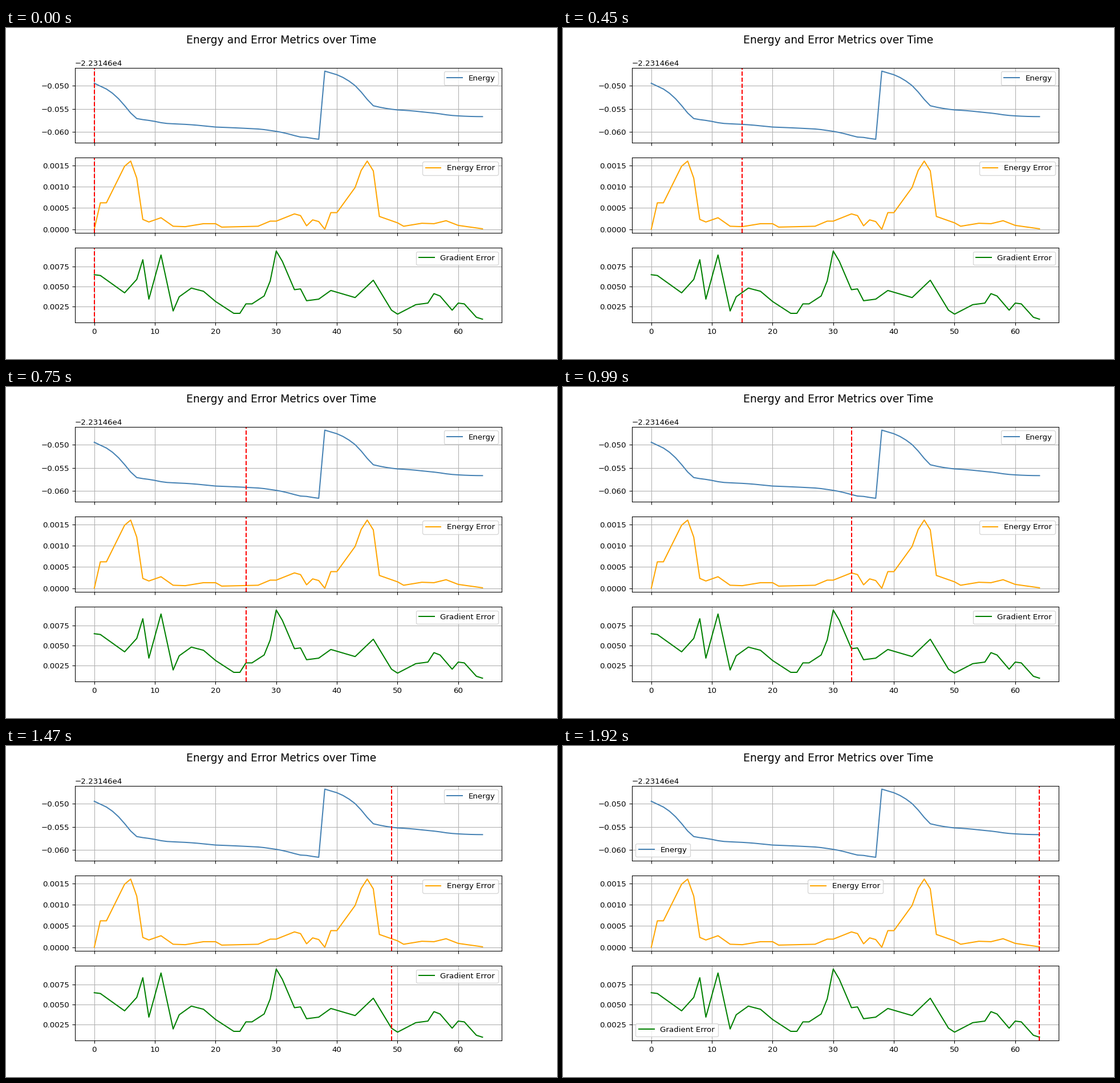
These frames come from a looping animation (966 by 580 pixels, 1.95 s). A matplotlib script:

```python
import numpy as np
import matplotlib.pyplot as plt
from matplotlib.animation import FuncAnimation

STEPS = 65
INTERVAL = 30  # ms
RESTART = 38   # step at which the second descent begins
E_START = -22314.64948
E_JUMP = 0.01472

x = np.arange(STEPS)


def polyline(*keys):
    """Values at every step on straight lines through (step, value) keys."""
    return np.interp(x, *zip(*keys))


# Two descents, each a burst followed by small ripples
energy_error = 1e-5 * polyline(
    (0, 0), (1, 62), (2, 62), (5, 148), (6, 160), (7, 120), (8, 23),
    (9, 17), (11, 27), (13, 7), (15, 6), (18, 13), (20, 13), (21, 5),
    (27, 7), (29, 19), (30, 19), (33, 36), (34, 32), (35, 8), (36, 22),
    (37, 18), (RESTART, 0), (39, 39), (40, 39), (43, 98), (44, 138),
    (45, 160), (46, 137), (47, 30), (50, 15), (51, 7), (54, 14),
    (56, 13), (58, 20), (60, 9), (64, 1),
)

# The error is the energy lost in each step
energy = E_START - np.cumsum(energy_error) + E_JUMP * (x >= RESTART)

grad_error = 1e-4 * polyline(
    (0, 65), (1, 64), (5, 42), (7, 59), (8, 84), (9, 34), (11, 90),
    (13, 19), (14, 37), (16, 48), (18, 44), (20, 31), (23, 16), (24, 16),
    (25, 28), (26, 28), (28, 38), (29, 57), (30, 95), (31, 82), (33, 46),
    (34, 47), (35, 32), (37, 34), (39, 45), (43, 36), (46, 58), (49, 20),
    (50, 15), (53, 27), (55, 29), (56, 41), (57, 38), (59, 20), (60, 29),
    (61, 28), (63, 11), (64, 8.6),
)

series = [
    ("Energy", "steelblue", energy),
    ("Energy Error", "orange", energy_error),
    ("Gradient Error", "green", grad_error),
]

# 966 x 580 pixels
fig, axes = plt.subplots(3, 1, sharex=True, figsize=(10, 6.00415), dpi=96.6)
fig.suptitle("Energy and Error Metrics over Time", fontsize=14)

cursors = []
for ax, (label, color, values) in zip(axes, series):
    ax.plot(x, values, color=color, label=label)
    cursors.append(ax.axvline(0, color="red", linestyle="--"))
    ax.grid(True)
    # "best" is re-evaluated on each draw, so the legend dodges the cursor
    ax.legend(loc="best")


def update(step):
    for cursor in cursors:
        cursor.set_xdata([step, step])
    return cursors


anim = FuncAnimation(fig, update, frames=STEPS, interval=INTERVAL, repeat=True)
plt.show()
```
